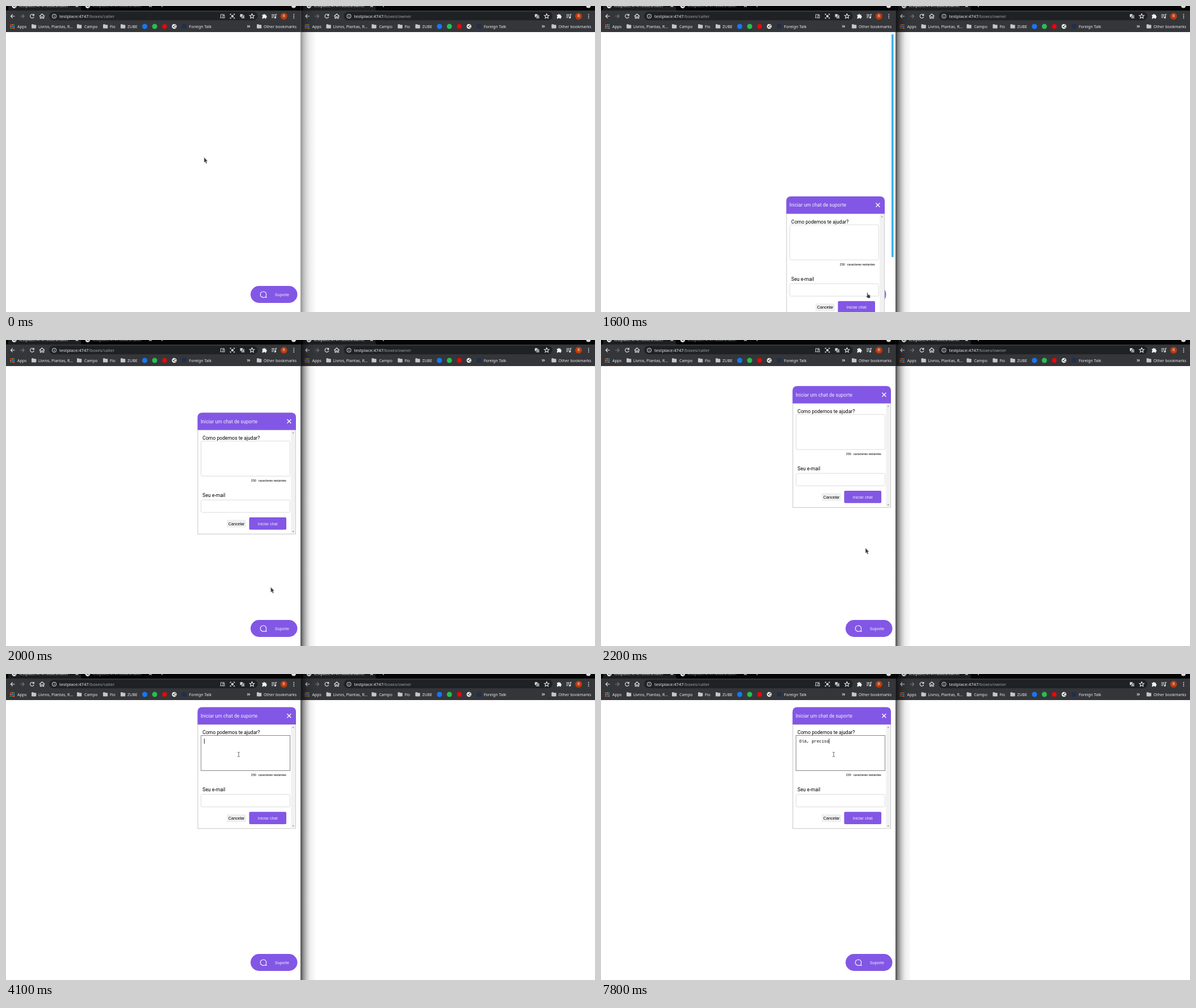
These frames come from a looping animation (1038x540 px, 8000 ms). An HTML page:

```html
<!DOCTYPE html>
<html lang="pt-BR">
<head>
<meta charset="utf-8">
<title>Chat de suporte</title>
<style>
html, body { margin: 0; width: 100%; height: 100%; overflow: hidden; background: #fff; }
svg { display: block; position: absolute; left: 0; top: 0; }
text { white-space: pre; }
.ui { font-family: "Noto Sans", sans-serif; font-size: 7.03px; fill: #e8eaed; }
.url { font-size: 7.6px; }
.tab { font-size: 6.8px; }
.page { font-family: Roboto, sans-serif; font-size: 8.65px; fill: #000; }
.small { font-size: 5.4px; }
.button { font-family: "Liberation Sans", Arial, sans-serif; font-size: 7.21px; }
.mono { font-family: "Liberation Mono", monospace; font-size: 7.3px; }
.line { fill: none; stroke: #e8eaed; stroke-width: 1.1; }
</style>
</head>
<body>
<svg id="stage" width="1038" height="540" viewBox="0 0 1038 540"></svg>
<script>
const LOOP = 8000;
const PURPLE = '#8257e5';
const PANEL_TOP = 58, PANEL_DROP = 290, PANEL_START = 1540;
const MESSAGE = 'Olá, preciso';
const TYPED = [[6000, 1], [6200, 2], [6700, 3], [7100, 5], [7300, 6], [7600, 9], [7800, 12]];
const POINTER = [
  [200, 349, 267], [700, 467, 505], [1800, 467, 505], [2200, 466, 367],
  [2600, 425, 170], [2900, 425, 170], [3000, 410, 142]
];

const text = (x, y, s, cls, more = '') => `<text x="${x}" y="${y}" class="${cls}" ${more}>${s}</text>`;
const line = (d, more = '') => `<path d="${d}" class="line" ${more}/>`;
const rect = (x, y, w, h, fill, more = '') =>
  `<rect x="${x}" y="${y}" width="${w}" height="${h}" fill="${fill}" ${more}/>`;
const dot = (x, y, r, fill) => `<circle cx="${x}" cy="${y}" r="${r}" fill="${fill}"/>`;
const folder = x =>
  `<path d="M${x} 33q0-.8.8-.8h2.5l1 1.1h3.2q.8 0 .8.8v4.7q0 .8-.8.8h-6.700q-.8 0-.8-.8z" fill="#c4c7c9"/>`;
const globe = (x, y) => dot(x, y, 4.2, '#f1f3f4') +
  `<path d="M${x - 3} ${y - 1}l2.400.3 1 1.500-1 1.500zM${x + .3} ${y - 3}l2.300 1-.6 1.400-1.700-.7zM${x + 1} ${y + 1}h2l-1.500 2z" fill="#35363a"/>`;

function appsIcon() {
  const colors = ['#ea4335', '#f28b30', '#34a853'];
  let out = '';
  for (let i = 0; i < 9; i++) {
    const col = i % 3, row = Math.floor(i / 3);
    out += rect(7.3 + col * 2.9, 32.300 + row * 2.9, 1.9, 1.9, row === 1 && col > 0 ? '#4a8df5' : colors[(row + col) % 3]);
  }
  return out;
}

function tab(x, path, active, id = '') {
  return globe(x + 10.5, -.3) +
    text(x + 19, 2.3, 'testplace:4747/boxes/' + path, 'ui tab', `${id} style="fill:${active ? '#dadce0' : '#85888c'}"`) +
    line(`M${x + 119} -3l4 4.800m0-4.800l-4 4.800`, 'stroke-width=".9"');
}

function bookmarks() {
  return appsIcon() + text(20, 38.5, 'Apps', 'ui') +
    [[45, 57, 'Livros, Plantas, R...'], [125, 138, 'Campo'], [171, 183, 'Fio'], [202, 214, 'ZUBE'], [442, 454, 'Other bookmarks']]
      .map(([icon, x, label]) => folder(icon) + text(x, 38.5, label, 'ui')).join('') +
    dot(244.5, 36, 4.6, '#1877f2') + dot(262, 36, 4.5, '#25c04f') + dot(279.5, 36, 4, '#f00') +
    globe(296.5, 36) + rect(310, 32, 8, 8, '#20304a') + text(322.5, 38.5, 'Foreign Talk', 'ui') +
    line('M425.200 34l1.800 2-1.800 2m2.600-4l1.800 2-1.800 2');
}

function toolbar() {
  return line('M15.500 18h-7m3.200-3.300l-3.300 3.300 3.300 3.300') +
    line('M25 18h7m-3.200-3.300l3.300 3.300-3.300 3.300', 'style="stroke:#77797c"') +
    line('M48.600 15.700a3.400 3.400 0 1 0 .7 3.200M49.300 14v2.600h-2.700') +
    line('M59 18l4.500-4 4.500 4M60.400 17.500v4.300h2v-2.800h2.200v2.800h2v-4.300') +
    line('M88.500 18a3.500 3.500 0 1 1-7 0a3.500 3.500 0 1 1 7 0M85 17.500v2.400M85 15.700v1', 'stroke-width=".9" style="stroke:#c4c7ca"') +
    rect(412.500, 14.300, 4.800, 5.200, '#bdc1c6') + rect(415.500, 16.600, 4.300, 5, '#202124', 'stroke="#bdc1c6" stroke-width=".8"') +
    line('M413.500 16h2.600m-1.300-1v1m-1.200 2l2.200-2M416.600 20.500l1.200-2.700 1.200 2.700', 'stroke-width=".6"') +
    line('M433.500 13.700l1.200 2.800 3 .2-2.300 2 .7 3-2.600-1.600-2.600 1.600.7-3-2.300-2 3-.2z', 'stroke-width=".9"') +
    '<path d="M451.500 15.500h2.200a1.300 1.300 0 1 1 2.600 0h2.200v2.200a1.300 1.300 0 1 1 0 2.600v2h-2.300a1.200 1.200 0 0 0-2.400 0h-2.300v-2.400a1.200 1.200 0 0 0 0-2.300z" fill="#f1f3f4"/>' +
    line('M468 15.200h5.600M468 17.700h5.600M468 20.200h3.500M475.300 20.500v-5.800h2') + dot(474.300, 20.500, 1.5, '#e8eaed') +
    dot(489.700, 18, 6, '#b93c0e') + text(489.700, 20.200, 'R', 'ui', 'text-anchor="middle" font-size="6"') +
    [14.8, 18, 21.2].map(y => dot(507.300, y, .9, '#e8eaed')).join('');
}

function browser(x, path, tabs, plus, extra = '') {
  return `<g transform="translate(${x})">` +
    rect(0, 0, 519, 46, '#35363a') + rect(0, 0, 519, 8, '#050505') +
    `<path d="M1 8q3 0 3-3v-5h128v5q0 3 3 3z" fill="#1d1e20"/>` +
    rect(76, 10.300, 367.500, 15, '#202124', 'rx="7.5"') + tabs +
    line(`M${plus - 3} -1h6m-3-3v6`, 'stroke-width=".9"') + dot(507, -.5, 4, '#dcdedf') +
    toolbar() + extra +
    text(94, 20.700, `testplace:4747<tspan fill="#9aa0a6">/boxes/${path}</tspan>`, 'ui url') +
    bookmarks() + '</g>';
}

const deviceIcons =
  line('M378.500 20v-5h6.500M377 20.700h4.500M382.300 16.500h2.700v4.500h-2.700z', 'stroke-width=".8" style="stroke:#c4c7ca"') +
  line('M395.300 16v-1.800h1.800m3.700 0h1.800v1.800m0 4v1.800h-1.800m-3.700 0h-1.800v-1.800', 'stroke-width=".9"') +
  rect(397, 16, 4, 4, '#c4c7ca');

const shadow = (id, stops) =>
  `<linearGradient id="${id}">${stops.map((o, i) => `<stop offset="${[0, .2, .4, .6, 1][i]}" stop-opacity="${o}"/>`).join('')}</linearGradient>`;

const panel =
  rect(338, 31, 172.500, 183.700, '#fff', 'stroke="#c6c6c6"') +
  `<path d="M337.500 31V9q0-8.500 8.500-8.500h156.500q8.500 0 8.500 8.500v22z" fill="${PURPLE}"/>` +
  text(343, 18.900, 'Iniciar um chat de suporte', 'page', 'style="fill:#f3effd"') +
  line('M495.400 12.200l7 7m0-7l-7 7', 'style="stroke:#fff;stroke-width:1.3"') +
  rect(502.200, 31.500, 8, 183, '#f1f1f1') +
  '<path d="M504.200 37l2-2.300 2 2.300zM504.200 209.300l2 2.300 2-2.300z" fill="#a3a3a3"/>' +
  text(346.300, 48, 'Como podemos te ajudar?', 'page') +
  rect(343.700, 50.500, 156.800, 62, '#fff', 'id="area" rx="2.5" stroke="#dcdce0"') +
  text(349.300, 62.700, '', 'mono', 'id="message"') + rect(349, 56, .8, 9, '#000', 'id="caret"') +
  text(431.700, 122.300, '250', 'page small', 'id="left"') + text(444.800, 122.300, 'caracteres restantes', 'page small') +
  text(346.300, 149.300, 'Seu e-mail', 'page') +
  rect(343.700, 154.500, 156.800, 22, '#fff', 'rx="2.5" stroke="#dcdce0"') +
  rect(389, 189.500, 34, 13.500, '#efefef', 'rx="1"') + text(391.700, 198.800, 'Cancelar', 'button') +
  rect(428.500, 185.300, 65.500, 21.700, PURPLE, 'rx="2"') +
  text(461.200, 198.800, 'Iniciar chat', 'button', 'text-anchor="middle" fill="#f3effd"');

const pointers =
  '<path id="arrow" d="M0 0v9.300l2.100-1.600 1.500 3.300 1.700-.8-1.500-3.200 2.500-.4z" fill="#3e3e40" stroke="#ddd" stroke-width=".5"/>' +
  '<path id="hand" d="M1.300 1q.9-.9 1.600.3l.9 3 2.700.7q1.400.5 1.200 2l-.5 3.600h-4.200l-2.700-3.400q-.6-1.200.6-1.200l1.200.9z" fill="#3e3e40" stroke="#fff" stroke-width=".6"/>' +
  '<path id="beam" d="M-2-4q1.500 0 2 .8q.5-.8 2-.8M0-3.200v6.400M-2 4q1.500 0 2-.8q.5.8 2 .8" fill="none" stroke="#555" stroke-width=".9"/>';

document.getElementById('stage').innerHTML =
  `<defs>${shadow('calm', [.42, .25, .14, .07, 0])}${shadow('strong', [.7, .4, .2, .07, 0])}</defs>` +
  rect(0, 0, 1038, 540, '#fff') +
  browser(519.400, 'owner', tab(4, 'owner', true), 145.600) +
  rect(519, 0, 28, 540, 'url(#calm)', 'id="shade"') +
  browser(0, 'caller', tab(4, 'caller', true) + tab(133.500, 'caller', false, 'id="idleTab"'), 275, deviceIcons) +
  rect(512, 50, 3.500, 482, '#3daee9', 'id="thumb" rx="1.2"') +
  '<g id="support">' + rect(431, 494, 82.500, 30, PURPLE, 'id="pill" rx="15"') +
  line('M458 511.700A5.200 5.200 0 1 0 456 513.700L458.900 514.500z', 'style="stroke:#fff" stroke-linejoin="round"') +
  text(473.700, 511.900, 'Suporte', 'button', 'fill="#f3effd"') + '</g>' +
  `<g id="panel">${panel}</g><g id="pointer">${pointers}</g>`;

const el = Object.fromEntries([...document.querySelectorAll('[id]')].map(n => [n.id, n]));
const set = (id, name, value) => el[id].setAttribute(name, value);
const show = (id, on) => set(id, 'visibility', on ? 'visible' : 'hidden');

// The CSS "ease" curve, solved by bisection.
function ease(p) {
  if (p <= 0 || p >= 1) return Math.min(1, Math.max(0, p));
  const bezier = (a, b, u) => 3 * a * u * (1 - u) ** 2 + 3 * b * u * u * (1 - u) + u ** 3;
  let lo = 0, hi = 1;
  for (let i = 0; i < 24; i++) {
    const mid = (lo + hi) / 2;
    if (bezier(.25, .25, mid) < p) lo = mid; else hi = mid;
  }
  return bezier(.1, 1, lo);
}

function pointerAt(t) {
  const next = POINTER.findIndex(k => k[0] > t);
  if (next === 0) return POINTER[0].slice(1);
  if (next < 0) return POINTER[POINTER.length - 1].slice(1);
  const [t0, x0, y0] = POINTER[next - 1], [t1, x1, y1] = POINTER[next];
  const p = (t - t0) / (t1 - t0);
  return [x0 + (x1 - x0) * p, y0 + (y1 - y0) * p];
}

function render(t) {
  const [x, y] = pointerAt(t);
  const hover = y >= 494;
  set('pointer', 'transform', `translate(${x} ${y})`);
  show('beam', t >= 3000);
  show('hand', hover);
  show('arrow', !hover && t < 3000);
  set('pill', 'fill', hover ? '#8f69e8' : PURPLE);

  const active = t >= 1500;
  set('shade', 'fill', active ? 'url(#strong)' : 'url(#calm)');
  el.idleTab.style.fill = active ? '#9a9da1' : '#85888c';

  // While the panel rises it overflows the page, which brings a scrollbar.
  const open = t > PANEL_START;
  const top = PANEL_TOP + PANEL_DROP * (1 - ease((t - PANEL_START) / 1000));
  const overflow = open && top + 321 > 540;
  const shift = overflow ? -11 : 0;
  set('panel', 'transform', `translate(${shift} ${top})`);
  set('panel', 'display', open ? 'inline' : 'none');
  set('support', 'transform', `translate(${shift})`);
  show('thumb', overflow);
  set('thumb', 'height', Math.min(486, 486 * 494 / (top + 275)));

  const focus = t >= 3100;
  set('area', 'stroke', focus ? '#85858a' : '#dcdce0');
  set('area', 'rx', focus ? 0 : 2.5);
  const count = TYPED.reduce((n, [at, chars]) => t >= at ? chars : n, 0);
  el.message.textContent = MESSAGE.slice(0, count);
  el.left.textContent = 250 - Math.max(0, count - 1);
  set('caret', 'x', 349 + count * 4.38);
  const blinkedOff = (t >= 3400 && t < 4100) || (t >= 4600 && t < 5200);
  set('caret', 'display', focus && !blinkedOff ? 'inline' : 'none');
}

function tick() {
  render(Math.floor(performance.now() % LOOP / 100) * 100);
  requestAnimationFrame(tick);
}
tick();
</script>
</body>
</html>
```
